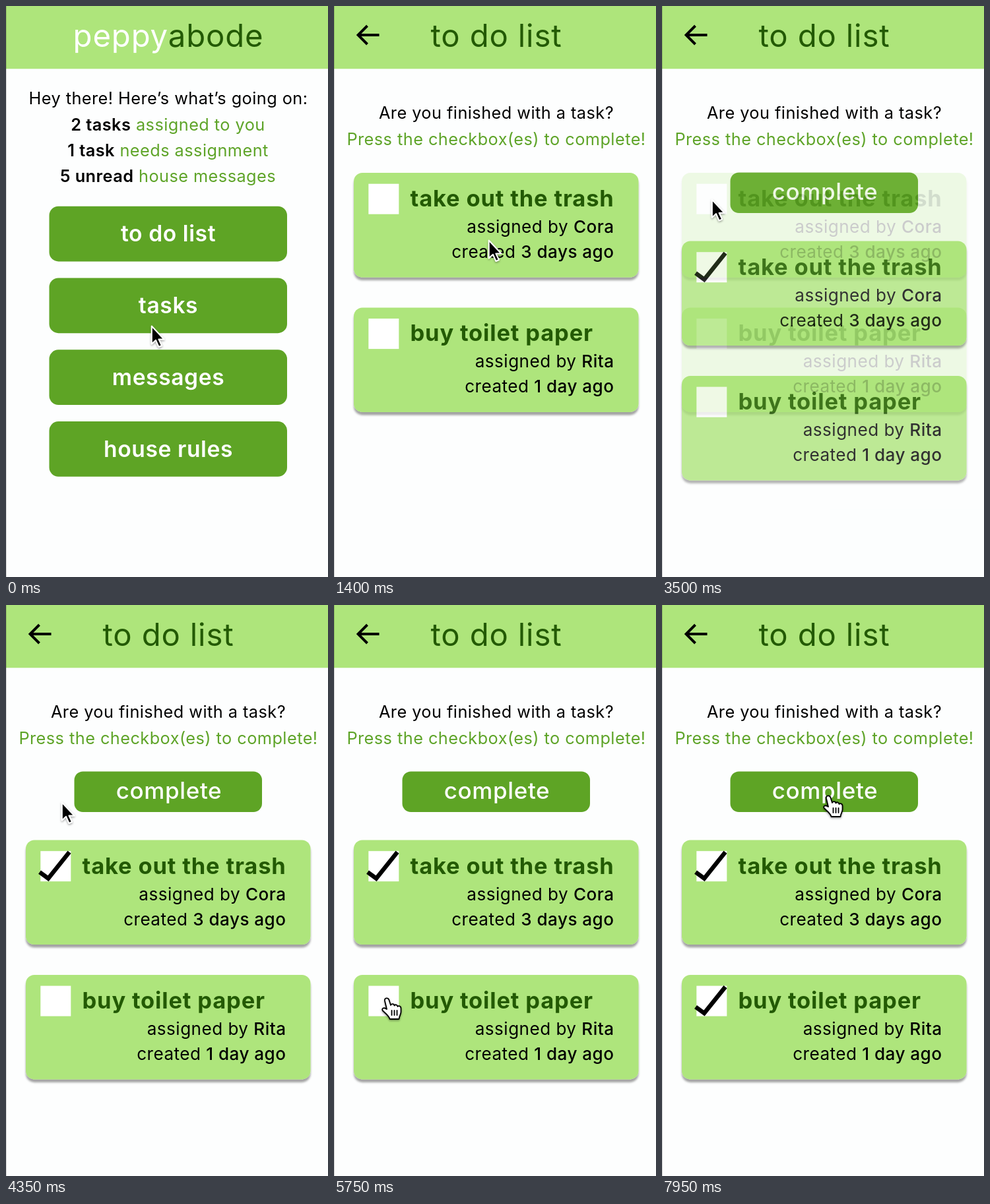
An HTML page that plays this animation: 488x866 px, repeating every 8000 ms.

```html
<!DOCTYPE html>
<html lang="en">
<head>
<meta charset="utf-8">
<title>House chores app</title>
<style>
  html, body { margin: 0; width: 100%; height: 100%; overflow: hidden; background: #fdfefe; }
  svg { display: block; width: 100%; height: 100%; }
  text { font-family: Inter, "Open Sans", sans-serif; font-size: 25.3px; letter-spacing: .018em; white-space: pre; }
  .mid { text-anchor: middle; }
  .end { text-anchor: end; font-size: 26.1px; }
  .title { font-size: 47.3px; fill: #235a04; }
  .btn { font-size: 33.6px; font-weight: 600; fill: #fff; }
  .done { font-size: 35px; font-weight: 500; fill: #fff; }
  .task { font-size: 34.5px; font-weight: 700; letter-spacing: .024em; fill: #235a04; }
  .semi { font-weight: 600; }
  .med { font-weight: 500; }
  .green { fill: #5ea428; }
</style>
</head>
<body>
<svg id="stage" viewBox="0 0 488 866">
  <defs>
    <filter id="lift" x="-5%" y="-5%" width="110%" height="120%">
      <feDropShadow dx="0" dy="4.5" stdDeviation="1.6" flood-opacity=".36"/>
    </filter>
    <filter id="soft" x="-30%" y="-30%" width="160%" height="170%">
      <feDropShadow dx="0" dy="1.5" stdDeviation="1.5" flood-opacity=".4"/>
    </filter>
  </defs>
  <g id="home"></g>
  <g id="list"></g>
  <g id="picked"></g>
  <g id="cursor" filter="url(#soft)">
    <path id="arrow" d="M.8 1.5V28.5L7 22.8L11.5 33L16 31L11.5 21.5H19.5Z" fill="#000" stroke="#fff" stroke-width="2" stroke-linejoin="round"/>
    <g id="hand" stroke="#000" stroke-width="1.8" stroke-linecap="round" stroke-linejoin="round">
      <path fill="#fff" d="M-4 3.5C-5-1.5 1-2 2.4 2L5 10C6 7.5 10 7.5 10.5 10.5C11.5 8.5 15 9 15.5 12C16.5 10.5 20.5 11 20.5 15V20C20.5 24 18 26 17.5 31H3.5C3 27-2 23-7 18.5C-9.5 15-5.5 12.5-1 16Z"/>
      <path fill="none" d="M6.5 18V25M10.5 18V25M14.5 18V25"/>
    </g>
  </g>
</svg>
<script>
const LOOP = 8000;
const $ = id => document.getElementById(id);
const rect = (x, y, w, h, r, fill, more = '') =>
  `<rect x="${x}" y="${y}" width="${w}" height="${h}" rx="${r}" fill="${fill}" ${more}/>`;
const text = (x, y, cls, body) => `<text x="${x}" y="${y}" class="${cls}">${body}</text>`;
const span = (cls, body) => `<tspan class="${cls}">${body}</tspan>`;

const page = title =>
  rect(0, 0, 488, 866, 0, '#fdfefe') + rect(0, 0, 488, 95.3, 0, '#aee57b') +
  rect(0, 0, 1, 866, 0, '#000', 'opacity=".16"') + text(246, 62, 'mid title', title);

const buttons = ['to do list', 'tasks', 'messages', 'house rules'];
const buttonY = i => 303.7 + i * 108.8;

function homePage() {
  const news = [['2 tasks', 'assigned to you'], ['1 task', 'needs assignment'], ['5 unread', 'house messages']];
  return page('<tspan fill="#fff">peppy</tspan>abode') +
    text(246, 149, 'mid', 'Hey there! Here’s what’s going on:') +
    news.map(([a, b], i) => text(245.5, 188.5 + i * 39.2, 'mid', span('semi', a) + ' ' + span('green', b))).join('') +
    buttons.map((b, i) => rect(65.5, buttonY(i), 360.5, 83.7, 14, '#5ea425') +
      text(246, buttonY(i) + 53.5, 'mid btn', b)).join('');
}

const tick = (y, id) =>
  `<path id="${id}" d="M51 ${y + 32}L64 ${y + 41.5}L96 ${y + 1.5}" fill="none" stroke="#000" stroke-width="6.5"/>`;

function card(y, name, by, age) {
  return rect(30, y, 431.5, 158.5, 13, '#aee57b', 'filter="url(#lift)"') +
    rect(52.3, y + 16.7, 46, 46, 0, '#fff') +
    text(115.5, y + 51, 'task', name) +
    text(424.5, y + 91, 'end', 'assigned by ' + span('med', by)) +
    text(424.5, y + 129, 'end', 'created ' + span('med', age));
}

const listPage = top => page('to do list') +
  '<path d="M68.5 44H37M50.5 30L36.5 44L50.5 58" fill="none" stroke="#000" stroke-width="3.9"/>' +
  text(246, 171, 'mid', 'Are you finished with a task?') +
  text(246, 210.5, 'mid green', 'Press the checkbox(es) to complete!') +
  card(top, 'take out the trash', 'Cora', '3 days ago') +
  card(top + 204.4, 'buy toilet paper', 'Rita', '1 day ago');

$('home').innerHTML = homePage();
$('list').innerHTML = listPage(253);
$('picked').innerHTML = listPage(356.5) +
  rect(103.5, 252.5, 284.5, 61.5, 13, '#5ea425') + text(247, 294, 'mid done', 'complete') +
  tick(373.2, 'tick1') + tick(577.6, 'tick2');

// Pointer path: time, x, y
const path = [
  [0, 220, 484], [50, 220, 484], [800, 234, 354], [1350, 234, 354], [2400, 220, 349],
  [2580, 220, 349], [3100, 73, 291], [3350, 73, 291], [3900, 84, 298], [4380, 84, 298],
  [5000, 100, 541], [5150, 100, 541], [5720, 81, 597], [6810, 81, 597], [6950, 190, 546],
  [7300, 318, 450], [7650, 272, 418], [7860, 253, 290], [LOOP, 253, 290]
];

// Slope at a key; zero where the pointer rests
function slope(i, axis) {
  const a = path[i - 1], b = path[i], c = path[i + 1];
  const still = (p, q) => p[1] === q[1] && p[2] === q[2];
  if (!a || !c || still(a, b) || still(b, c)) return 0;
  return (c[axis] - a[axis]) / (c[0] - a[0]);
}

function pointer(t) {
  let i = 0;
  while (i < path.length - 2 && t >= path[i + 1][0]) i++;
  const a = path[i], b = path[i + 1], d = b[0] - a[0], u = (t - a[0]) / d;
  const s = u * u * (3 - 2 * u);
  return [1, 2].map(k => a[k] + (b[k] - a[k]) * s +
    d * (slope(i, k) * u * (1 - u) ** 2 - slope(i + 1, k) * u * u * (1 - u)));
}

const fade = (t, start, length) => Math.min(1, Math.max(0, (t - start) / length));

function overLink(t, x, y) {
  const inside = (l, top, w, h) => x >= l && x <= l + w && y >= top && y <= top + h;
  if (t < 100) return false;
  if (t < 1250) return buttons.some((_, i) => inside(65, buttonY(i), 361, 84));
  const top = t < 3450 ? 253 : 356.5;
  return [0, 204.4].some(dy => inside(52, top + dy + 16.7, 46, 46)) ||
    (t >= 3450 && inside(103, 252, 285, 62));
}

function draw(t) {
  const [x, y] = pointer(t), hand = overLink(t, x, y);
  $('list').setAttribute('opacity', fade(t, 1150, 200));
  $('picked').setAttribute('opacity', fade(t, 3340, 200));
  $('tick2').setAttribute('opacity', fade(t, 6060, 190));
  $('cursor').setAttribute('transform', `translate(${x.toFixed(2)} ${y.toFixed(2)})`);
  $('hand').setAttribute('visibility', hand ? 'visible' : 'hidden');
  $('arrow').setAttribute('visibility', hand ? 'hidden' : 'visible');
}

const begin = performance.now();
function loop() {
  draw((performance.now() - begin) % LOOP);
  requestAnimationFrame(loop);
}
loop();
</script>
</body>
</html>
```
